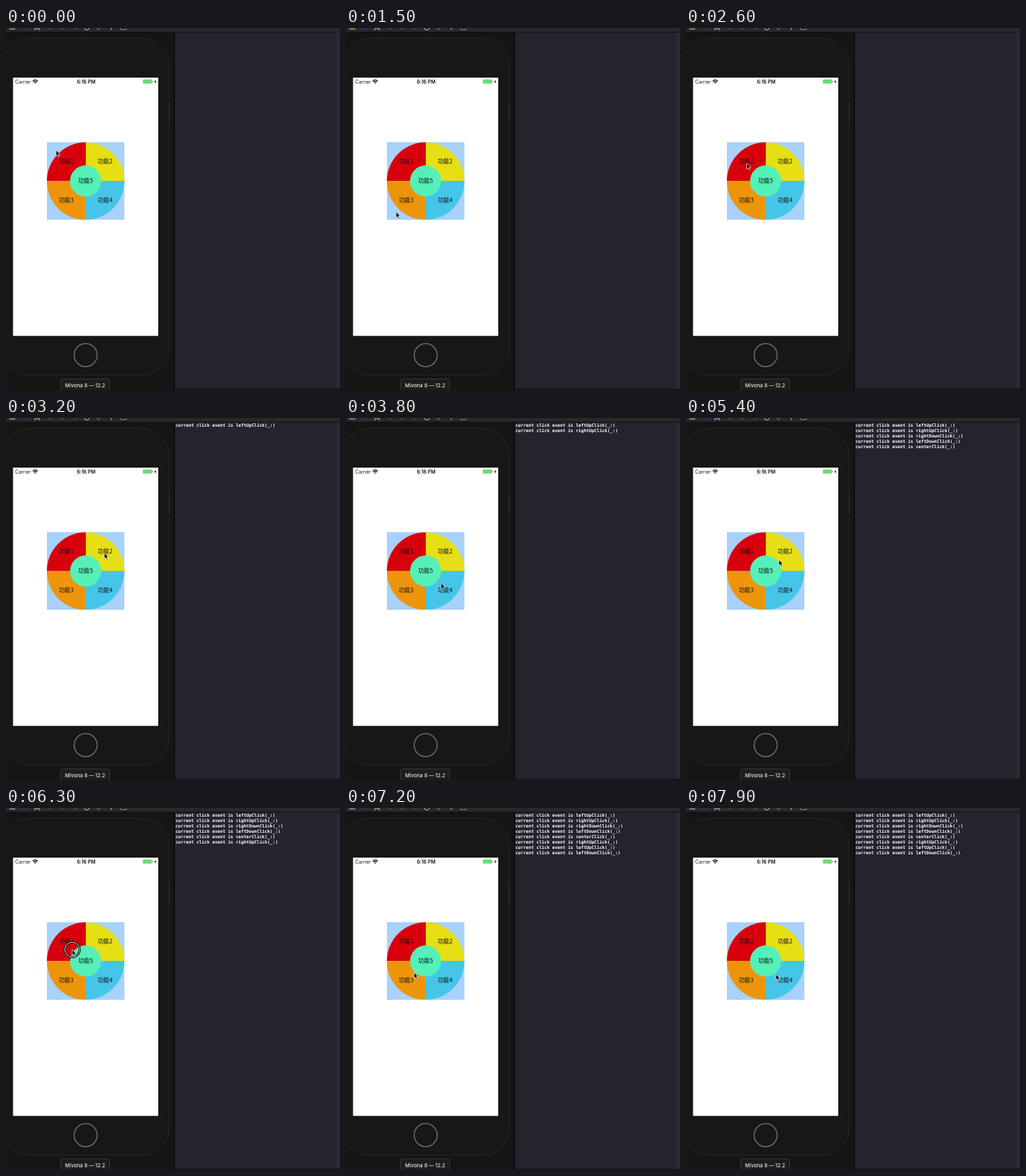
Recreate the animation shown at these times as an HTML page. Size 498 px wide and 540 px high, loop 8000 ms.

```html
<!DOCTYPE html>
<html lang="zh">
<head>
<meta charset="utf-8">
<style>
html, body { margin: 0; width: 100%; height: 100%; overflow: hidden; background: #151515; }
svg { display: block; width: 498px; height: 540px; }
text { font-family: Inter, "Noto Sans CJK SC", "Noto Sans CJK", sans-serif; }
.wheel text { font: 500 8.6px "Noto Sans CJK SC", "Noto Sans CJK", sans-serif; text-anchor: middle; fill: #111; }
.log text { font: bold 6.5px "DejaVu Sans Mono", monospace; fill: #fff; }
</style>
</head>
<body>
<svg viewBox="0 0 498 540">
  <clipPath id="disc"><circle cx="118.7" cy="228.3" r="57.8"/></clipPath>

  <rect width="498" height="540" fill="#151515"/>
  <rect x="241.5" y="110" width="3" height="34" rx="1" fill="#29292a"/>
  <rect x="-5" y="15.5" width="248" height="502.5" rx="40" fill="#171717" stroke="#292929"/>
  <rect x="10.5" y="74" width="216.5" height="385.3" fill="#fff"/>
  <circle cx="118.8" cy="488" r="17.2" fill="#171717" stroke="#6b6b6b" stroke-width="1.6"/>

  <g fill="#111">
    <text x="13.8" y="82.5" font-size="7.1">Carrier</text>
    <text x="119.5" y="82.5" font-size="7.2" font-weight="600" text-anchor="middle">6:16 PM</text>
    <path d="M39.7 79.2Q43.6 75.6 47.5 79.2M41.2 80.8Q43.6 78.7 46 80.8" fill="none" stroke="#111" stroke-width="1.3"/>
    <path d="M42.3 82Q43.6 81 44.9 82L43.6 83.3Z"/>
    <rect x="204.2" y="77" width="13.2" height="5.8" rx="1.5" fill="#5fe36c" stroke="#aab5aa" stroke-width=".6"/>
    <rect x="218" y="78.8" width=".9" height="2.2" fill="#888"/>
    <path d="M223.1 77L221 80.4H222.5L221.8 83L224.3 79.4H222.7Z"/>
  </g>

  <g class="wheel" id="wheel">
    <rect x="61" y="170.3" width="115.5" height="115.8" fill="#a8d1fc"/>
    <g clip-path="url(#disc)">
      <rect x="61" y="170" width="58" height="58" fill="#d9000d"/>
      <rect x="119" y="170" width="58" height="58" fill="#e6df13"/>
      <rect x="61" y="228" width="58" height="59" fill="#ec950b"/>
      <rect x="119" y="228" width="58" height="59" fill="#45c6e9"/>
    </g>
    <circle cx="118.7" cy="228.3" r="23.2" fill="#55f0b8"/>
  </g>

  <rect x="81.5" y="523.5" width="73" height="20" rx="2.5" fill="#1d1d1d" stroke="#393939"/>
  <text x="118" y="535.6" font-size="7.6" font-weight="500" fill="#e6e6e6" text-anchor="middle">Mivona 8 — 12.2</text>

  <rect x="250" width="2" height="540" fill="#0b0b0d"/>
  <rect x="252" y="6" width="246" height="532" fill="#24242f"/>
  <rect x="492.5" y="6" width="5.5" height="532" fill="#2b2b35"/>
  <rect x="252" y="538" width="246" height="2" fill="#16161a"/>

  <rect width="498" height="6" fill="#29292a"/>
  <rect y="5.6" width="498" height="1" fill="#0d0d0e"/>
  <g fill="none" stroke="#c9c9c9">
    <path d="M5 1.5H14M43 3.5V1H50V3.5M117 0Q117 3 120.5 3T124 0M157 0V3"/>
    <path d="M24 1.5H32" stroke="#3434a0"/>
    <path d="M62 1.5H106" stroke="#555" stroke-dasharray="6 13"/>
    <path d="M135 0L138 3L140 0M171 0V2.5H179V0" stroke="#888"/>
  </g>

  <g class="log" id="log"></g>
  <g id="pointer">
    <g id="ring" fill="none">
      <circle r="11" stroke="#0a0a0a" stroke-width="3.2"/>
      <circle r="11" stroke="#fff"/>
    </g>
    <path d="M0 0V8.6L2 6.9L3.4 10L4.9 9.3L3.6 6.3H6.2Z" fill="#050505" stroke="#fff" stroke-width=".7"/>
  </g>
</svg>
<script>
const LOOP = 8000, STEP = 100;
const HOLD = 100;   // how long a press lasts
const SETTLE = 150; // rest before a press
const CENTER = { x: 118.7, y: 228.3 };
const SIDES = {
  leftUp: [-1, -1], rightUp: [1, -1], rightDown: [1, 1], leftDown: [-1, 1], center: [0, 0]
};

const byId = id => document.getElementById(id);
const pointer = byId("pointer"), ring = byId("ring");

function addText(parent, x, y, content) {
  const node = document.createElementNS("http://www.w3.org/2000/svg", "text");
  node.setAttribute("x", x);
  node.setAttribute("y", y);
  node.textContent = content;
  parent.append(node);
  return node;
}

["leftUp", "rightUp", "leftDown", "rightDown", "center"].forEach((side, i) => {
  const [sx, sy] = SIDES[side];
  addText(byId("wheel"), CENTER.x + 29 * sx, CENTER.y + 3.1 + 29 * sy, `功能${i + 1}`);
});

// One tap per side, at a steady pace, at a given reach from the center.
const tour = (sides, start, gap, reachX, reachY, logs) => sides.map((side, i) => ({
  side, logs,
  time: start + gap * i,
  x: CENTER.x + SIDES[side][0] * reachX,
  y: CENTER.y + SIDES[side][1] * reachY
}));

const around = ["leftUp", "rightUp", "rightDown", "leftDown"];
const taps = [
  ...tour(around, 100, 430, 44, 46, false),
  ...tour(around.slice(0, 2), 2850, 500, 28, 27, true),
  ...tour(around.slice(2), 3850, 500, 23, 18, true),
  ...tour(["center", "rightUp", "leftUp", "leftDown"], 4900, 700, 20, 17, true)
];
const rest = { time: 7700, x: 134, y: 248 };
const stops = [...taps, rest];

const lines = taps.filter(tap => tap.logs).map(({ side, time }, i) => ({
  node: addText(byId("log"), 252.7, 12.7 + i * 8.05, `current click event is ${side}Click(_:)`),
  time: time + HOLD
}));

const clamp = p => Math.min(1, Math.max(0, p));
const ease = p => p * p * p * (p * (6 * p - 15) + 10);
const show = (node, on) => node.setAttribute("visibility", on ? "visible" : "hidden");

function pointerAt(t) {
  const next = stops.find(stop => stop.time > t) || rest;
  const last = stops[Math.max(0, stops.indexOf(next) - 1)];
  const leave = last.time + HOLD, arrive = next.time - SETTLE;
  const p = ease(clamp((t - leave) / (arrive - leave)));
  return [last.x + (next.x - last.x) * p, last.y + (next.y - last.y) * p];
}

function draw(time) {
  const t = Math.floor(time % LOOP / STEP) * STEP;
  pointer.setAttribute("transform", `translate(${pointerAt(t)})`);
  show(ring, taps.some(tap => t >= tap.time && t < tap.time + HOLD));
  lines.forEach(line => show(line.node, t >= line.time));
}

const start = performance.now();
function frame() {
  draw(performance.now() - start);
  requestAnimationFrame(frame);
}
frame();
</script>
</body>
</html>
```
